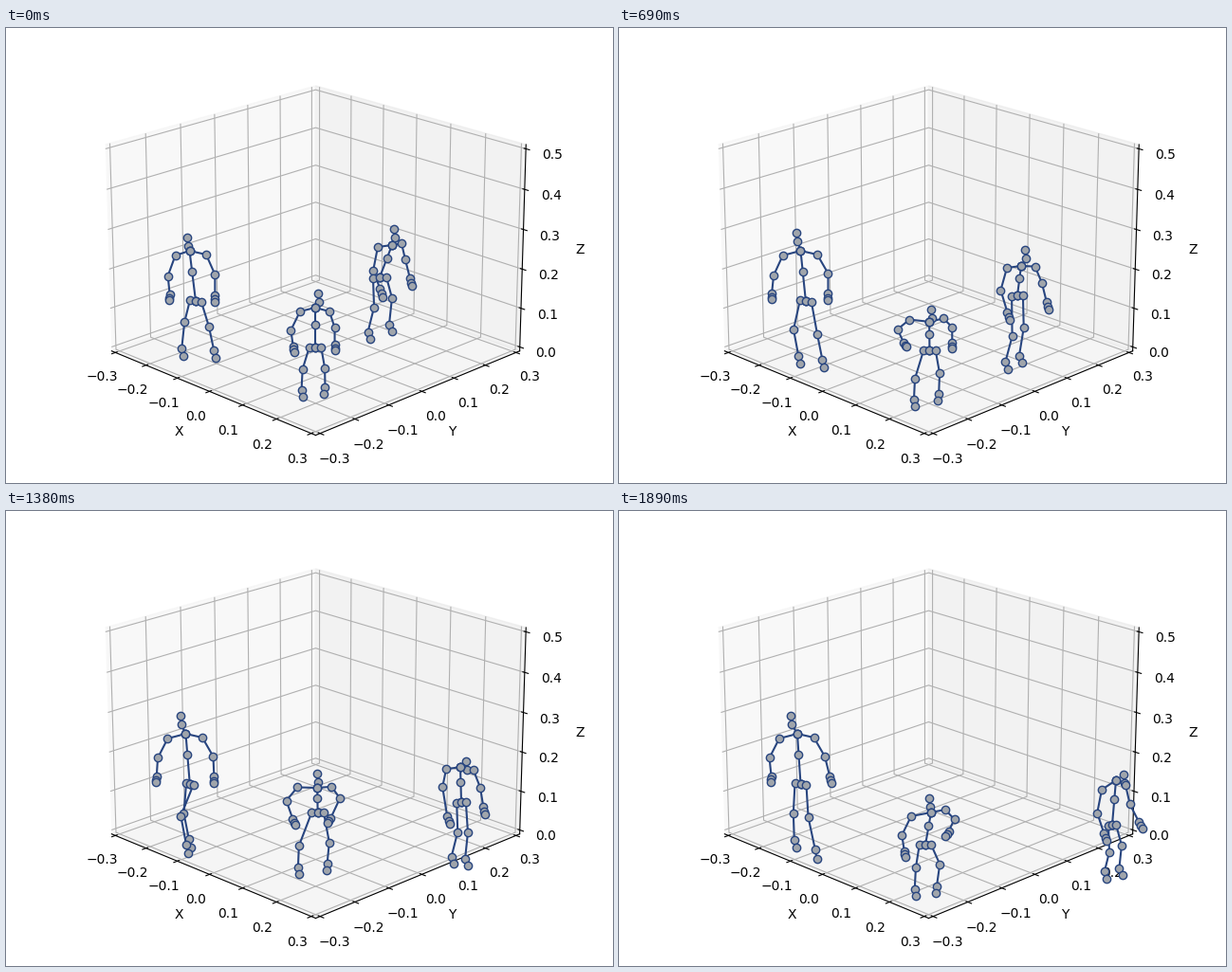
Recreate the animation shown at these times as a matplotlib script. Size 640 px wide and 480 px high, loop 1920 ms.

```python
import numpy as np
import matplotlib.pyplot as plt
from matplotlib.animation import FuncAnimation

W, H, DPI = 640, 480, 100
FRAMES, STEP = 64, 30
LINE, FILL = "#28457f", "#a0a5ab"


def ramp(t, a, b):
    """Smooth step from 0 at a to 1 at b."""
    u = np.clip((t - a) / (b - a), 0, 1)
    return u * u * (3 - 2 * u)


def bump(t, mid, width):
    return np.exp(-((t - mid) / width) ** 2)


def chain(start, *bones):
    """Joints after start; a bone is (length, degrees right of straight down)."""
    length, angle = np.array(bones, float).T
    angle = np.radians(angle)
    steps = np.column_stack([length * np.sin(angle), length * np.cos(angle)])
    return np.vstack([start, start + np.cumsum(steps, axis=0)])


def skeleton(head, chest, pelvis, shoulders, hip, arms, legs):
    """Joint chains; shoulders and hip are offsets, limbs are left then right."""
    head, chest, pelvis, hip = map(np.array, (head, chest, pelvis, hip))
    middle = chest + 0.42 * (pelvis - chest)
    chains = [np.vstack([head, head + (1, 9), chest, middle, pelvis])]
    for shoulder, arm in zip(shoulders, arms):
        joints = chain(chest + shoulder, *arm)
        hand = joints[2] + 0.6 * (joints[3] - joints[2])
        chains.append(np.vstack([chest, joints[:3], hand, joints[3]]))
    for side, leg in zip((-1, 1), legs):
        chains.append(np.vstack([pelvis, chain(pelvis + side * hip, *leg)]))
    return chains


def kicker(t):
    s = np.sin(np.pi * t)
    start = np.exp(-9 * t)
    kick = bump(t, 0.56, 0.12)
    swing = bump(t, 0.68, 0.2)
    grow = ramp(t, 0, 0.4)
    late = ramp(t, 0.65, 0.95)
    return skeleton(
        head=(191 - 10 * t, 216 + 5 * start),
        chest=(193.5 - 5.5 * t, 235),
        pelvis=(200 - 8.5 * t, 288),
        shoulders=[(4 * start - 19, 5), (17.5, 4)],
        hip=(6 - 2.5 * bump(t, 0.7, 0.1), 1),
        arms=[
            [(23, -20 - 7 * ramp(t, 0, 0.6)), (19.5, 6 - 13 * s), (6, -5)],
            [(23, 24 + 6 * ramp(t, 0, 0.3)), (21.5, 14 * late),
             (7, 14 * late - 2)]],
        legs=[
            [(24 + 8 * grow, -14 + 11 * ramp(t, 0.2, 0.9)),
             (28, -6 + 8 * t + 15 * s), (8.5, 13)],
            [(27 + 7 * grow + 9 * kick, 17 - 11 * t - 33 * swing),
             (26 + 9 * late + 23 * kick, 12 - 10 * kick),
             (8 + 2 * late + 6 * kick, 10)]])


def bower(t):
    s = np.sin(np.pi * t)
    bend = ramp(t, 0.3, 0.45) - ramp(t, 0.58, 0.73)
    hop = bump(t, 0.74, 0.08)
    land = ramp(t, 0.7, 0.95)
    turn = ramp(t, 0.42, 0.65)
    chest = np.array([326 + 3 * t, 295 + 37 * bend + 23 * land - 4 * hop])
    return skeleton(
        head=chest + (3 - 5 * t + 8 * bump(t, 0.46, 0.06), -15 + 5 * bend),
        chest=chest,
        pelvis=(326 + 4 * t - 7 * land,
                337 + 7.5 * bend + 15.5 * land - 20 * hop),
        shoulders=[(-16 - 5 * ramp(t, 0, 0.4), 4 - 6 * s - 2 * bend),
                   (15, 4 - 12 * bend - 7 * t)],
        hip=(6.3, 0),
        arms=[
            [(22 - 5 * s - 3 * bend, -26 - 18 * s - 20 * bend),
             (17 - 4 * bend + 4 * hop, 8 + 15 * s + 8 * bend),
             (6 - 2 * bend, 10 + 20 * s)],
            [(18 - 9 * bend - 4 * t, 18 + 25 * t + 45 * bend),
             (18 - 4 * bend - 4 * land + 5 * hop, -25 * turn),
             (6, -35 * turn)]],
        legs=[
            [(24 + 8 * s + 8 * hop, -17 - 8 * bump(t, 0.65, 0.1) + 8 * land),
             (22.5, -3 + 12 * bump(t, 0.56, 0.1)), (7, 10)],
            [(22 + 3 * s + 8 * hop, 10 + 14 * land),
             (20 + 4 * t, 1 - 9 * t), (7, -9)]])


# The walker's uneven pace: chest and pelvis at a few moments.
PACE = (0, 0.27, 0.46, 0.587, 0.73, 0.905, 1)
CHEST = ((407, 411, 437, 461, 479, 500, 524),
         (229, 240, 262, 268, 270, 278, 284))
PELVIS = ((394, 408, 432, 457, 480, 500, 520),
          (263, 276, 288, 296, 307, 329, 331))


def walker(t):
    s = np.sin(np.pi * t)
    stride = bump(t, 0.52, 0.09)
    reach = bump(t, 0.62, 0.15)
    drop = bump(t, 0.65, 0.25)
    late = ramp(t, 0.7, 0.9)
    chest, pelvis = (np.array([np.interp(t, PACE, axis) for axis in path])
                     for path in (CHEST, PELVIS))
    fore = 14 - 11 * bump(t, 0.62, 0.12) + 13 * ramp(t, 0.85, 1)
    return skeleton(
        head=chest + (2 + 6 * t, -17 + 11 * ramp(t, 0.58, 0.75)),
        chest=chest,
        pelvis=pelvis,
        shoulders=[(-15, 2 + 8 * late), (10 + 5 * s, -2 + 7 * t)],
        hip=(7 - 3 * t, -0.5),
        arms=[
            [(25 - 10 * reach, -11 - 16 * bump(t, 0.5, 0.12)),
             (21 + 11 * drop, 20 - 12 * drop), (9, 19)],
            [(17 + 4 * t, 13 + 11 * s), (21, fore), (8, fore)]],
        legs=[
            [(31 + 12 * bump(t, 0.38, 0.15) - 14 * bump(t, 0.91, 0.07),
              2 - 27 * stride),
             (27 + 12 * stride - 6 * ramp(t, 0.9, 1), -14 - 18 * stride),
             (8, 18)],
            [(23 + 13 * s, 15 - 15 * s),
             (28 + 4 * s - 4 * t, -6 - 8 * bump(t, 0.27, 0.1)), (8, 25)]])


def padded(lo, hi):
    pad = (hi - lo) / 48
    return lo - pad, hi + pad


fig = plt.figure(figsize=(W / DPI, H / DPI), dpi=DPI)
box = fig.add_axes([0, 0, 1, 1], projection="3d")
box.view_init(elev=20, azim=-45)
side_ticks = np.round(np.linspace(-0.3, 0.3, 7), 1)
box.set(xticks=side_ticks, yticks=side_ticks,
        zticks=np.round(np.linspace(0, 0.5, 6), 1),
        xlabel="X", ylabel="Y", zlabel="Z")
box.set(xlim=padded(-0.3, 0.3), ylim=padded(-0.3, 0.3), zlim=padded(0, 0.5))

# The figures are posed on a flat stage in pixels, over the box.
stage = fig.add_axes([0, 0, 1, 1])
stage.set(xlim=(0, W), ylim=(H, 0))
stage.axis("off")

actors = [kicker, bower, walker]
bones = [stage.plot([], [], color=LINE, lw=1.5)[0] for _ in actors]
dots = [stage.plot([], [], "o", ms=6, mfc=FILL, mec=LINE, mew=1, zorder=3)[0]
        for _ in actors]
BREAK = np.full((1, 2), np.nan)


def draw(i):
    t = i / (FRAMES - 1)
    for actor, bone, dot in zip(actors, bones, dots):
        chains = actor(t)
        bone.set_data(*np.vstack([p for c in chains for p in (c, BREAK)]).T)
        dot.set_data(*np.vstack(chains).T)
    return bones + dots


anim = FuncAnimation(fig, draw, frames=FRAMES, interval=STEP,
                     repeat=True, repeat_delay=0)
plt.show()
```
